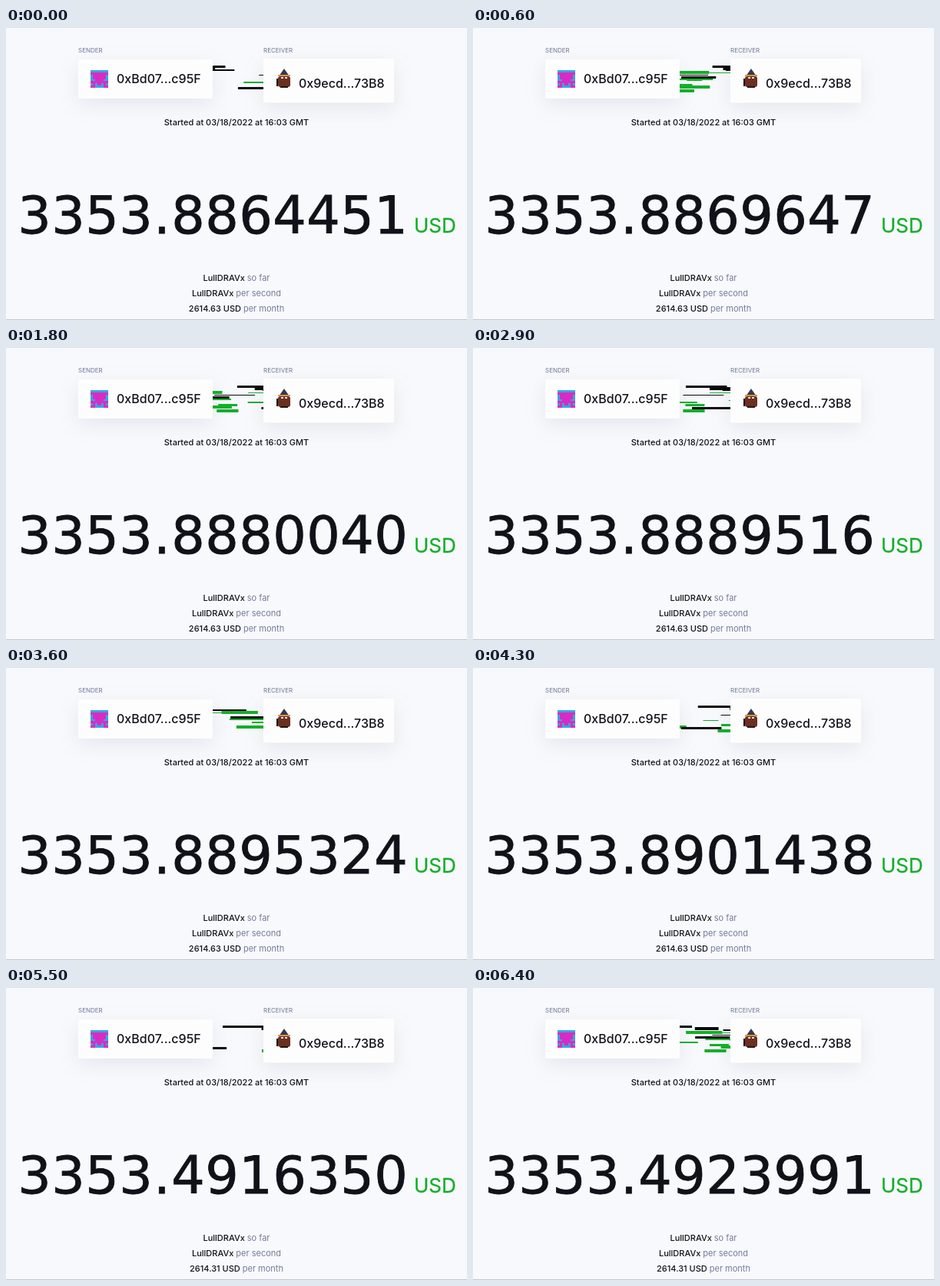
Recreate the animation shown at these times as an HTML page. Size 600 by 381 pixels, loop 6500 ms.

```html
<!DOCTYPE html>
<html lang="en">
<head>
<meta charset="utf-8">
<title>Money stream</title>
<style>
  html, body { margin: 0; width: 100%; height: 100%; overflow: hidden; background: #f8f9fc; }
  svg { display: block; width: 600px; height: 381px; }
  text { font: 500 11px Inter, "Open Sans", sans-serif; fill: #101219; }
  .label { font-size: 8px; font-weight: 400; fill: #6d7797; }
  .address { font-size: 16px; }
  .card { fill: #fdfdfe; filter: drop-shadow(0 8px 13px rgba(96, 104, 140, .12)); }
  .row { text-anchor: middle; }
  .muted { font-weight: 400; fill: #727d9b; }
  #amount { font: 68.5px "DejaVu Sans", sans-serif; text-anchor: middle; stroke: #101219; stroke-width: .8px; }
  .currency { font-size: 26px; font-weight: 400; fill: #14ae2b; stroke: #14ae2b; stroke-width: .3px; }
</style>
</head>
<body>
<svg viewBox="0 0 600 381">
  <defs><clipPath id="gap"><rect x="269" y="46" width="66" height="40"/></clipPath></defs>
  <text class="label" x="94" y="32">SENDER</text>
  <text class="label" x="335" y="32">RECEIVER</text>
  <rect class="card" x="94" y="41" width="175" height="51" rx="2"/>
  <rect class="card" x="335" y="40" width="170" height="57.5" rx="2"/>
  <g id="stream" clip-path="url(#gap)"></g>
  <g id="tile" shape-rendering="crispEdges"></g>
  <g id="figure">
    <rect x="354" y="63" width="16" height="14" rx="3" fill="#6b2f20"/>
    <path d="M355 63 L362 53 L369 63 Z" fill="#343a52"/>
    <path d="M354 62 H370" stroke="#dd9342" stroke-width="2"/>
    <path d="M358 65 H366" stroke="#f0e4d8" stroke-width="2" stroke-dasharray="3 2"/>
    <path d="M353 66 V76 M357 77 H367" stroke="#1b1719" stroke-width="2"/>
  </g>
  <text class="address" x="144" y="72">0xBd07...c95F</text>
  <text class="address" x="381" y="78">0x9ecd...73B8</text>
  <text class="row" x="300" y="127">Started at 03/18/2022 at 16:03 GMT</text>
  <text id="amount" y="268"></text>
  <text class="currency" x="531" y="267">USD</text>
  <text class="row" x="300" y="330">LullDRAVx <tspan class="muted">so far</tspan></text>
  <text class="row" x="300" y="350">LullDRAVx <tspan class="muted">per second</tspan></text>
  <text class="row" x="300" y="370"><tspan id="rate"></tspan> USD <tspan class="muted">per month</tspan></text>
  <rect y="380" width="600" height="1" fill="#c3c5cc"/>
</svg>
<script>
const LOOP = 6500, STEP = 100, REPRICE = 5200;
const GAP_LEFT = 269, BAR_COUNT = 14, BAR_SPAN = 170;
const $ = id => document.getElementById(id);

let seed = 11;
const random = () => (seed = seed * 16807 % 2147483647) / 2147483647;
const between = (low, high) => low + (high - low) * random();

function addRect(parent, x, y, width, height, fill) {
  const el = document.createElementNS('http://www.w3.org/2000/svg', 'rect');
  const attrs = { x, y, width, height, fill };
  for (const name in attrs) el.setAttribute(name, attrs[name]);
  parent.append(el);
  return el;
}

// Mirrored random block tile, mostly pink with blue towards its edges
const TILE = 8, block = 23 / TILE;
addRect($('tile'), 110, 55, 23, 23, '#d92bc4');
for (let row = 0; row < TILE; row++) {
  for (let col = 0; col < TILE / 2; col++) {
    const onEdge = col === 0 || row === 0 || row === TILE - 1;
    if (random() > (onEdge ? 0.5 : 0.15)) continue;
    for (const x of [col, TILE - 1 - col]) {
      addRect($('tile'), 110 + x * block, 55 + row * block, block, block, '#38a6df');
    }
  }
}

const bars = Array.from({ length: BAR_COUNT }, (_, i) => {
  const width = between(18, 58);
  const y = 49 + Math.round(i * 33 / BAR_COUNT);
  const height = 1 + Math.floor(between(0.5, 3.6));
  return {
    width,
    offset: between(0, BAR_SPAN),
    speed: between(0.09, 0.16), // px per ms
    el: addRect($('stream'), 0, y, width, height, random() < 0.45 ? '#14ae2b' : '#08090c')
  };
});

// The decimal point takes a narrower cell than the digits.
const cells = Array.from({ length: 12 }, (_, i) => 37 + 44 * i - 10 * (1 + Math.sign(i - 4)));
$('amount').setAttribute('x', cells.join(' '));

function amountAt(time) {
  const step = time / STEP;
  const fraction = time < REPRICE
    ? 8864451 + 305.68 * Math.floor(2.81 * step + 0.75)
    : 4916350 + 305.64 * Math.floor(2.81 * (step - 55) + 0.3);
  return '3353.' + Math.floor(fraction);
}

function draw(time) {
  $('amount').textContent = amountAt(time);
  $('rate').textContent = time < REPRICE ? '2614.63' : '2614.31';
  for (const { el, width, offset, speed } of bars) {
    el.setAttribute('x', GAP_LEFT - width + (offset + time * speed) % BAR_SPAN);
  }
}

const start = performance.now();
function tick() {
  const time = (performance.now() - start) % LOOP;
  draw(Math.floor(time / STEP) * STEP);
  requestAnimationFrame(tick);
}
tick();
</script>
</body>
</html>
```
